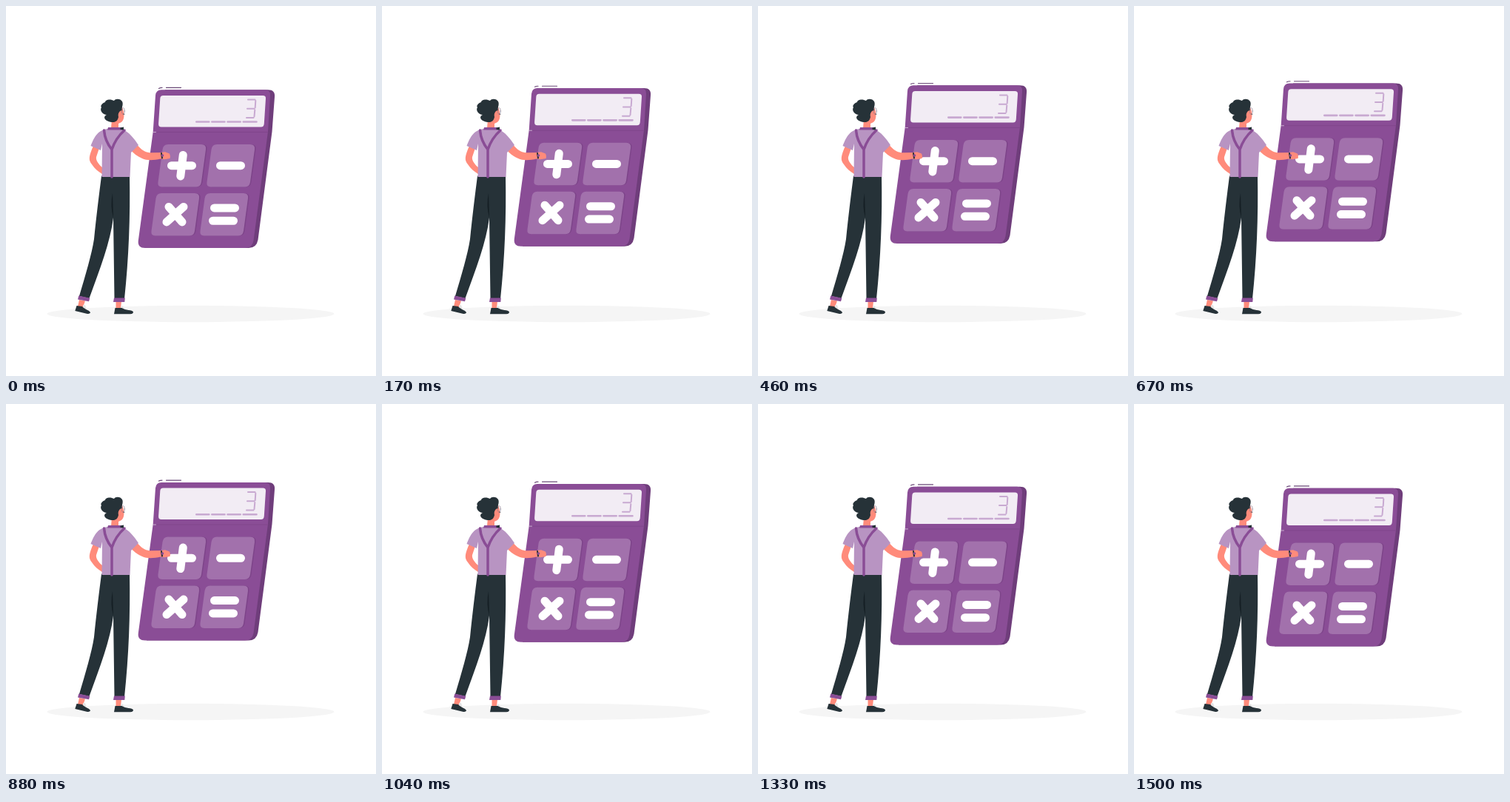
An HTML page for the animation above (1540 ms loop, 500x500 px).

```html
<!DOCTYPE html>
<html lang="en">
<head>
<meta charset="utf-8">
<title>Floating calculator</title>
<style>
  html, body { margin: 0; width: 100%; height: 100%; overflow: hidden; background: #fff; }
  svg { display: block; width: 100%; height: 100%; }
  .purple { fill: #8a4d96; }
  .skin { fill: #ff8b7b; }
  .dark { fill: #263238; }
  .line { fill: none; stroke-linecap: round; }
</style>
</head>
<body>
<svg viewBox="0 0 500 500">
  <defs>
    <path id="key" d="M219 187H264Q271 187 270 194L264 238Q263 244.5 257 244.5H211Q204.5 244.5 205.5 238L211.5 194Q212.5 187 219 187Z"/>
    <g id="button">
      <use href="#key" x="1.5" fill="#7d4489"/>
      <use href="#key" fill="#a271ac"/>
    </g>
  </defs>

  <ellipse cx="249.5" cy="416" rx="194" ry="11.2" fill="#f5f5f5"/>

  <g id="calculator">
    <path fill="#6f3d7b" d="M215 113.3H354Q364 113.3 363 123L359.5 170L340.500 316Q338.500 327 328 327H190L200 170Z"/>
    <path class="purple" d="M210 113.300H350Q357.500 113.300 357 121L354 170L334.500 317Q333 327 323 327H188Q177.500 327 178.800 317L198.700 170L202 121Q202.700 113.300 210 113.300Z"/>
    <path class="line" stroke="#7d4489" stroke-width=".8" d="M203 170.500H354"/>
    <path class="line" stroke="#d9c4de" stroke-width=".8" d="M199 170.500H202.500"/>
    <path class="line" stroke="#6b4a78" stroke-width="1.200" d="M206.500 111.500Q208 110.500 211 110.500M216.500 110.500H236.500"/>
    <path fill="#f2ecf4" d="M212.500 121H347Q351.300 121 351 125L348.800 159Q348.500 163.500 344.500 163.500H210Q205.800 163.500 206.100 159L208.300 125Q208.500 121 212.500 121Z"/>
    <g class="line" stroke="#c8a9d1">
      <path stroke-width="2" d="M327 126.500H336.500M326 138.700H335.500M325 151H334.500M337.300 128L336.700 137.500M336.300 140.500L335.500 149.500"/>
      <path stroke-width="2.600" d="M257.300 156.600H274.300M278.300 156.600H295.500M299.500 156.600H316.700M320.700 156.600H338.500"/>
    </g>
    <use href="#button"/>
    <use href="#button" x="66"/>
    <use href="#button" x="-9" y="66"/>
    <use href="#button" x="57" y="66"/>
    <path class="line" stroke="#fff" stroke-width="11" d="M223.500 215.700H251.500M239.300 201.500L235.800 230M289.500 215.700H317.500M220 271.500L238 292M240 271.500L217 292M281.500 273H309.500M279.500 290.300H307.500"/>
  </g>

  <g id="man">
    <path class="skin" d="M99 397L107 398.500L104 407L97 406ZM148.500 399H156L155 409H148.500Z"/>
    <path fill="#e6e6e6" d="M104 404L107 404L109 410L104 408ZM155 405.500H158L160.500 410L155 409Z"/>
    <path class="dark" d="M95.500 405L103 406C106 410 114 411.500 114 414.500Q113 416.500 109 415.700L93.300 412ZM147.500 408L156.500 408C161 411.500 171 410.500 172 413.500Q172 416 168 416.300H146Z"/>
    <path class="dark" d="M129 229.500H167C168 285 166 340 160 396H146.500L145 286C141 319 127 355 112.500 395L99 392C107 365 116 335 119 315C122 285 126 253 129 229.500Z"/>
    <path fill="#151f24" d="M144 253Q140.500 270 145 286Z"/>
    <path class="purple" d="M98.300 391.500L113.300 394.800L112 399.300L97 396.500ZM146 394.500H160.800L160.300 400H145Z"/>

    <path class="skin" d="M118 189C112 203 111 208 116 214C120 220 125 224 130 227V218C125 214 121 208 122 204L126 192Z"/>
    <path class="skin" d="M177 187C182 194 188 197.500 194 198.300L209 198L215 197.300L221 199.500Q222.500 203 221.500 206L214 207.300L209 206.500C200 208.500 190 209 184 206C177 203 172 199 168 194Z"/>
    <path fill="#b894c2" d="M137 166L158 167C166 170 174 180 179 188L169 198L167.500 231H129.500L130 186L128 195L114.500 189C119 178 123 168 137 166Z"/>
    <path class="line" stroke="#8a4d96" stroke-width="3.500" stroke-linecap="butt" d="M132.500 168C133.500 180 139 189 143 194M160 168C151 176 146 185 143 194V231"/>
    <path class="line" stroke="#263238" stroke-width="2" d="M210 199L211 205.500"/>
    <circle cx="211.500" cy="202" r="1.800" fill="#8a4d96"/>

    <path class="skin" d="M149 142L157 137C160 144 160.500 152 157 156C155 158 152.500 158 152 159V165H142L143 153Z"/>
    <path class="purple" d="M138 164H158.500V167.500H137Z"/>
    <path class="dark" d="M154.500 164.500L159 163.500V167.500L154.500 167Z"/>
    <path class="dark" d="M129 137C127 135 130 131 134 130C134 126.500 141 125 146 128C148 124.500 155 125 157 129C159 133 156 137 157 140C153 142 151 145 152 150C151 155 148 157 145 157C140 157 134 155 133 151C133 149 134 148 136 147C131 147 126 141 129 137Z"/>
    <ellipse class="line" cx="158.300" cy="142" rx="2" ry="4.500" stroke="#8f7f91" stroke-width=".7"/>
    <path class="line" stroke="#263238" stroke-width=".7" d="M152 142L157 140.500M158.500 146L160 146.500"/>
  </g>
</svg>
<script>
  const LOOP = 1540, PEAK = 1495, TOP = -9.45, RANGE = 10;
  const calculator = document.getElementById('calculator');
  const start = performance.now();

  function draw() {
    const phase = ((performance.now() - start - PEAK + LOOP) % LOOP) / LOOP;
    const y = TOP + RANGE * Math.abs(1 - 2 * phase);
    calculator.setAttribute('transform', `translate(0 ${y.toFixed(3)})`);
    requestAnimationFrame(draw);
  }
  draw();
</script>
</body>
</html>
```
